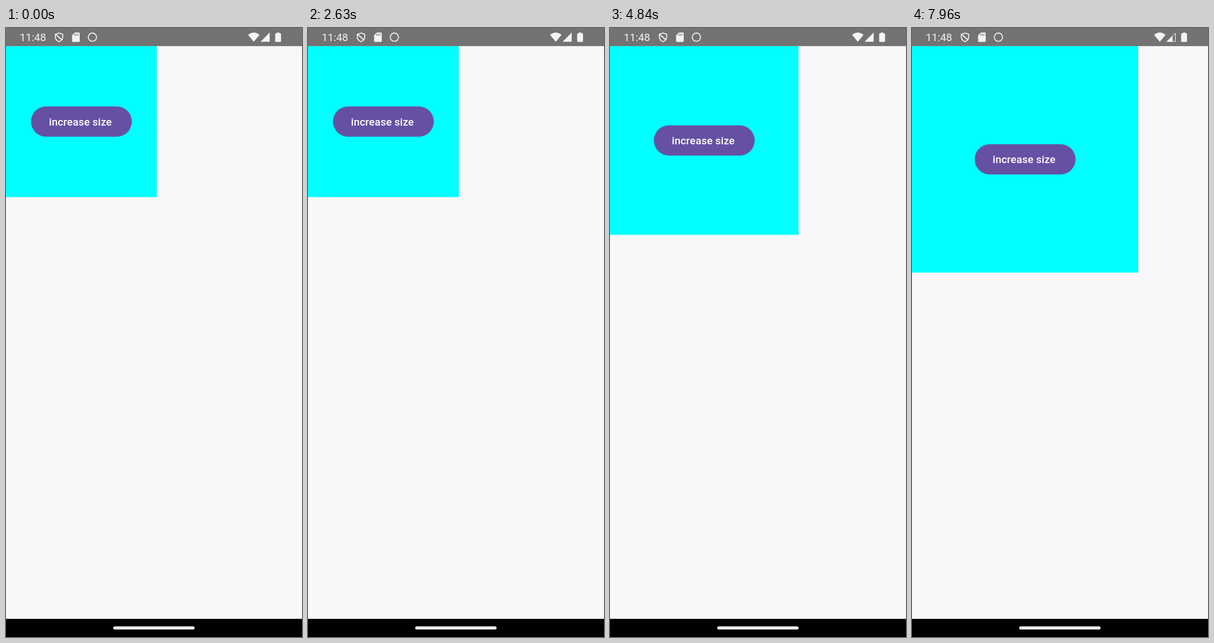
Recreate the animation shown at these times as an HTML page. Size 522x1073 px, loop 8000 ms.

```html
<!DOCTYPE html>
<html lang="en">
<head>
<meta charset="utf-8">
<title>Increase size</title>
<style>
  html, body { margin: 0; width: 100%; height: 100%; overflow: hidden; background: #f8f8fa; }
  svg { display: block; width: 522px; height: 1073px; }
  text { font-family: Roboto, sans-serif; font-size: 18.62px; }
</style>
</head>
<body>
<svg viewBox="0 0 522 1073">
  <rect width="522" height="1073" fill="#f8f8fa"/>
  <rect id="box" y="31.9" fill="#0ff"/>
  <g id="button">
    <rect x="-88.9" y="-26.6" width="177.8" height="53.2" rx="26.6" fill="#6650a4"/>
    <text x="-57.2" y="6.8" fill="#fff" font-weight="500" letter-spacing=".13">increase size</text>
  </g>

  <rect width="522" height="31.9" fill="#737373"/>
  <g fill="#f4f4f4">
    <text x="24.3" y="23">11:48</text>
    <g fill="none" stroke="#f4f4f4" stroke-width="1.7">
      <path d="M93.5 8.8L100 11.2V15.5Q100 21.5 93.5 24.2Q87 21.5 87 15.5V11.2ZM88 11.5L98.5 21"/>
      <circle cx="152.4" cy="16.2" r="7.3"/>
    </g>
    <path d="M121.5 8H128.5Q130 8 130 9.5V23Q130 24.5 128.5 24.5H118Q116.5 24.5 116.5 23V13Z"/>
    <path d="M121.4 10.3v3.2m2.8-3.2v3.2m2.8-3.2v3.2" stroke="#737373" stroke-width="1.4"/>
    <path d="M427 12.2Q437 3.8 447 12.2L437 24.2Z"/>
    <path id="full" d="M449 24.2L465 8V24.2Z"/>
    <g id="weak">
      <path d="M449 24.2L459.5 13.6V24.2Z"/>
      <path d="M449.9 23.7L464.5 9V23.7Z" fill="none" stroke="#f4f4f4"/>
    </g>
    <path d="M477.5 8H482.2V9.6H484Q485 9.6 485 10.6V23.4Q485 24.4 484 24.4H475.7Q474.7 24.4 474.7 23.4V10.6Q474.7 9.6 475.7 9.6H477.5Z"/>
  </g>

  <rect y="1041" width="522" height="32"/>
  <rect x="189" y="1054.2" width="143.6" height="5.6" rx="2.8" fill="#ededed"/>
</svg>
<script>
  const LOOP = 8000, GROW = 1530, STEP = 66.5, BASE = 266, TOP = 31.9;
  const PRESSES = [3035, 5925], SIGNAL_DROP = 6800;
  const [box, button, full, weak] =
    ["box", "button", "full", "weak"].map(id => document.getElementById(id));
  const progress = (t, start) => Math.min(1, Math.max(0, (t - start) / GROW));

  function draw() {
    const t = performance.now() % LOOP;
    const size = PRESSES.reduce((sum, start) => sum + STEP * progress(t, start), BASE);
    box.setAttribute("width", size);
    box.setAttribute("height", size);
    button.setAttribute("transform", `translate(${size / 2} ${TOP + size / 2})`);
    const low = t >= SIGNAL_DROP;
    full.style.display = low ? "none" : "";
    weak.style.display = low ? "" : "none";
    requestAnimationFrame(draw);
  }
  draw();
</script>
</body>
</html>
```
